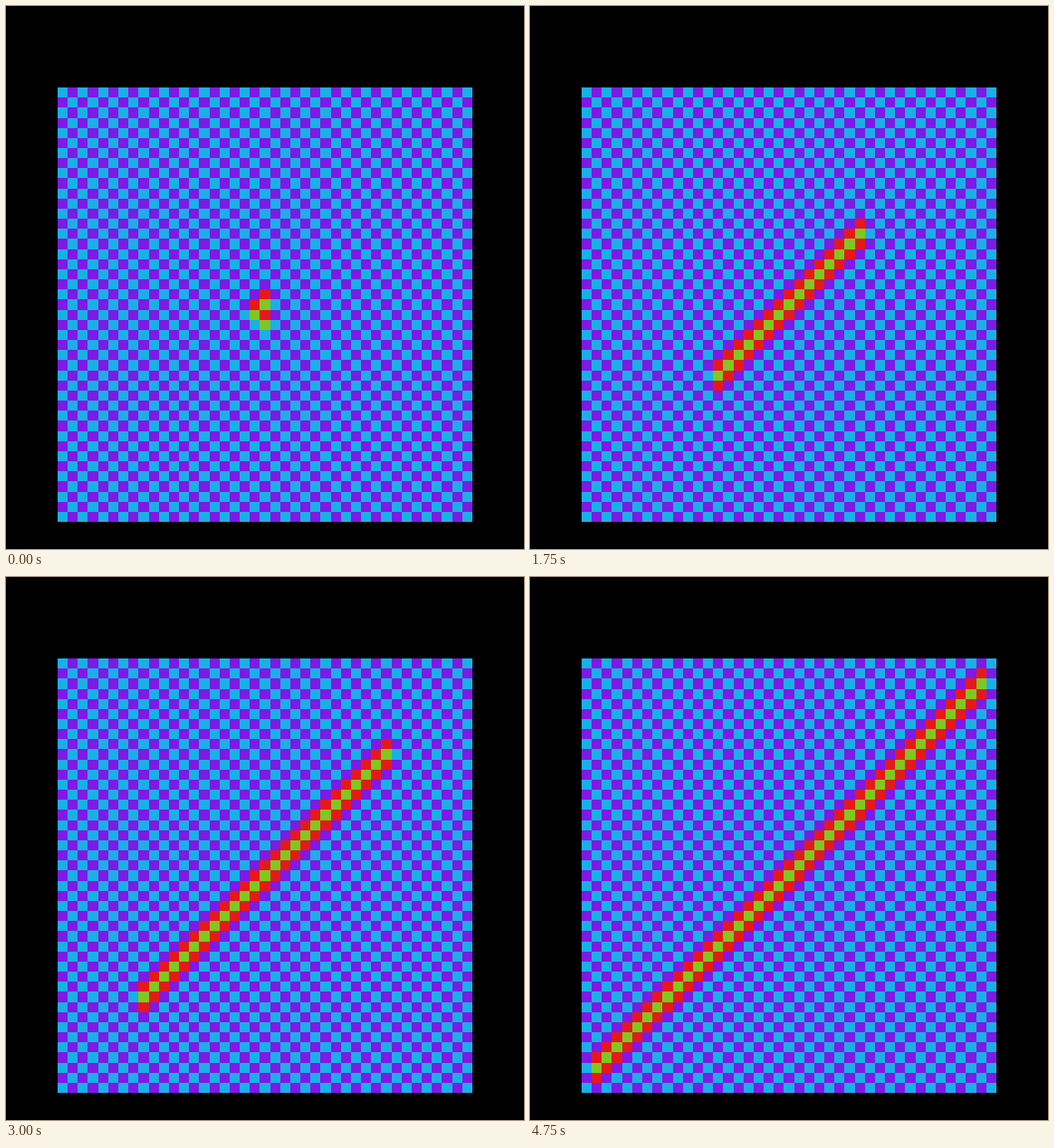
Animation, 572 px wide and 600 px high, one loop 5 s. Source, as an HTML page with a canvas:

```html
<!DOCTYPE html>
<html lang="en">
<head>
<meta charset="utf-8">
<title>Growing diagonal</title>
<style>
  html, body { margin: 0; width: 100%; height: 100%; overflow: hidden; background: #000; }
  canvas { display: block; }
</style>
</head>
<body>
<canvas id="stage" width="572" height="600"></canvas>
<script>
const ctx = document.getElementById('stage').getContext('2d');
const COLS = 41, ROWS = 43, STEPS = 20, STEP_MS = 250;
const CYAN = '#19b0e6', PURPLE = '#7f19e6', RED = '#e61919', GREEN = '#7ec820';

// Cell edges snap to whole pixels.
const edgeX = col => Math.round(56.97 + col * 458 / COLS);
const edgeY = row => Math.round(90.02 + row * 480 / ROWS);

function fillCell(col, row, color) {
  const x = edgeX(col), y = edgeY(row);
  ctx.fillStyle = color;
  ctx.fillRect(x, y, edgeX(col + 1) - x, edgeY(row + 1) - y);
}

const isOdd = (col, row) => (col + row) % 2 === 1;
const lit = (col, row) => fillCell(col, row, isOdd(col, row) ? GREEN : RED);

function draw(step) {
  ctx.fillStyle = '#000';
  ctx.fillRect(0, 0, 572, 600);
  for (let row = 0; row < ROWS; row++)
    for (let col = 0; col < COLS; col++)
      fillCell(col, row, isOdd(col, row) ? PURPLE : CYAN);

  // A three-cell-high band along the rising diagonal.
  for (let col = 20 - step; col <= 20 + step; col++)
    for (let offset = -1; offset <= 1; offset++)
      lit(col, 41 - col + offset);

  // The starting seed has three extra cells.
  if (step === 0) {
    lit(19, 21);
    lit(19, 22);
    lit(20, 23);
  }
}

const start = performance.now();
let shown = -1;
function tick() {
  const step = Math.floor((performance.now() - start) / STEP_MS) % STEPS;
  if (step !== shown) draw(shown = step);
  requestAnimationFrame(tick);
}
tick();
</script>
</body>
</html>
```
